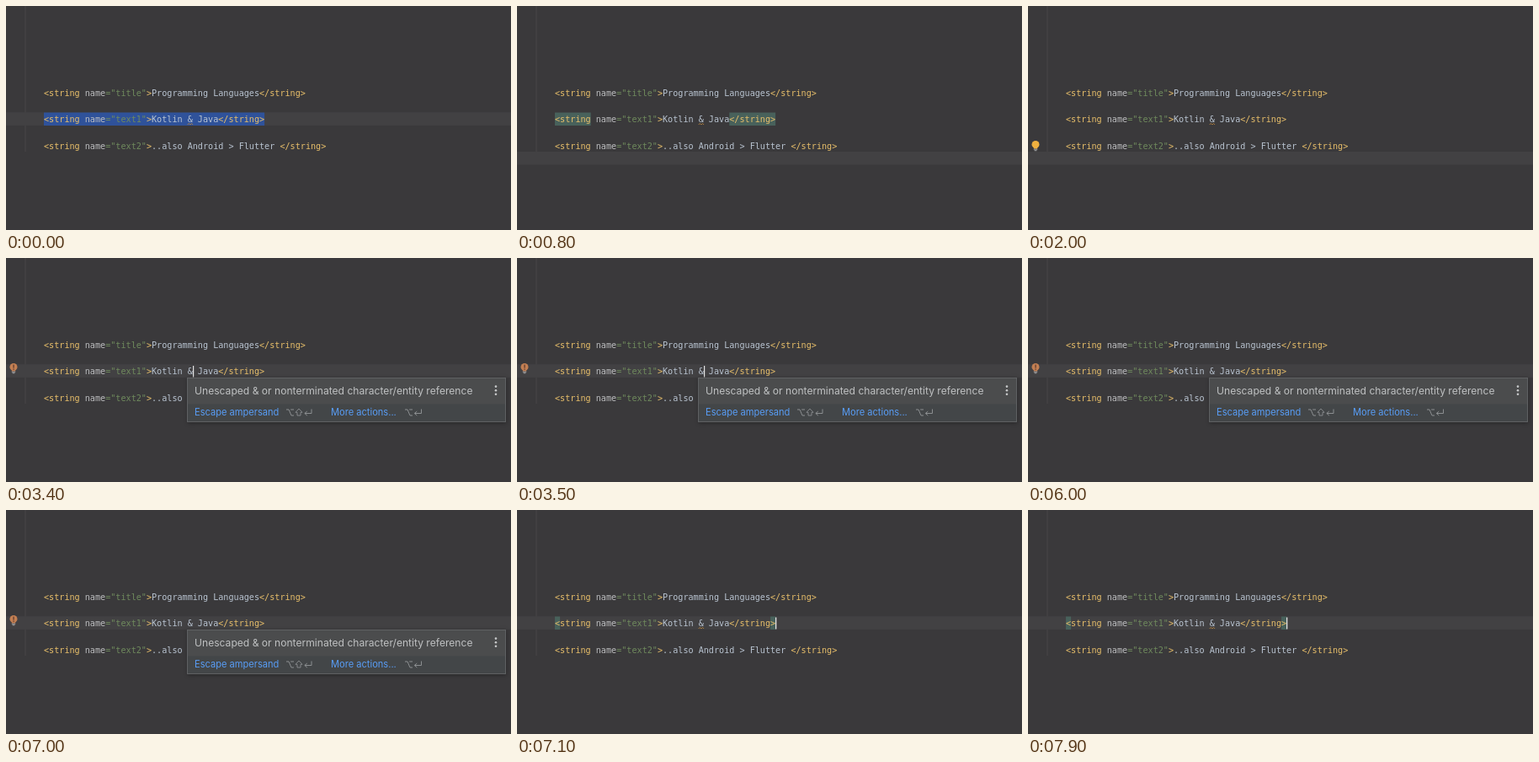
Recreate the animation shown at these times as an HTML page with a canvas. Size 600 px wide and 266 px high, loop 8 s.

```html
<!DOCTYPE html>
<html lang="en">
<head>
<meta charset="utf-8">
<title>Editor hint</title>
<style>
html, body { margin: 0; width: 100%; height: 100%; overflow: hidden; background: #3a393b; }
canvas { display: block; width: 600px; height: 266px; }
</style>
</head>
<body>
<canvas id="stage"></canvas>
<script>
const W = 600, H = 266, LOOP = 8000;
const MONO = '10.13px "DejaVu Sans Mono", monospace';
const SANS = 'Inter, Roboto, sans-serif';
const LEFT = 45;
const C = {
  bg: '#3a393b', row: '#424143', guide: '#484749',
  tag: '#e8bf6a', attr: '#bdbec0', value: '#6f8a5d', text: '#b9c4d1',
  select: '#2f529a', match: '#48615b', caret: '#e4e4e4', error: '#b9853f',
  tip: '#4b4c4d', tipFoot: '#434648', tipEdge: '#5f6163',
  tipText: '#bfc1c2', link: '#589df6', keys: '#8b8e90'
};
const LINES = [
  { y: 107, name: 'title', text: 'Programming Languages' },
  { y: 138.2, name: 'text1', text: 'Kotlin & Java' },
  { y: 169.5, name: 'text2', text: '..also Android > Flutter ' }
];

const canvas = document.getElementById('stage');
const ctx = canvas.getContext('2d');
const dpr = window.devicePixelRatio || 1;
canvas.width = W * dpr;
canvas.height = H * dpr;
ctx.scale(dpr, dpr);
ctx.font = MONO;
const charW = ctx.measureText('0').width;
const col = n => LEFT + n * charW;

function rect(x, y, w, h, color) {
  ctx.fillStyle = color;
  ctx.fillRect(x, y, w, h);
}

function dot(x, y, r, color) {
  ctx.fillStyle = color;
  ctx.beginPath();
  ctx.arc(x, y, r, 0, Math.PI * 2);
  ctx.fill();
}

function label(str, x, y, font, color) {
  ctx.font = font;
  ctx.fillStyle = color;
  ctx.fillText(str, x, y);
}

function stroke(points, color, width = 1) {
  ctx.strokeStyle = color;
  ctx.lineWidth = width;
  ctx.beginPath();
  points.forEach(([x, y], i) => i ? ctx.lineTo(x, y) : ctx.moveTo(x, y));
  ctx.stroke();
}

function codeLine({ y, name, text }) {
  let n = 0;
  const parts = [
    ['<string', C.tag], [' name', C.attr], [`="${name}"`, C.value],
    ['>', C.tag], [text, C.text], ['</string>', C.tag]
  ];
  for (const [str, color] of parts) {
    label(str, col(n), y, MONO, color);
    n += str.length;
  }
}

// Highlights a run of characters on the middle line.
function mark(from, count, color) {
  rect(col(from), 126.5, count * charW, 15.5, color);
}

function squiggle() {
  const x = col(28), pts = [];
  for (let i = 0; i <= 4; i++) pts.push([x + i * 1.6, i % 2 ? 139.4 : 141]);
  stroke(pts, C.error, 0.9);
}

function bulb(y, glass, alert) {
  dot(9, y - 1.6, 4.5, glass);
  rect(6.8, y + 1.5, 4.4, 2, glass);
  rect(6.8, y + 3.7, 4.4, 1, '#a5a6a7');
  rect(7.6, y + 5.2, 2.8, 1, '#a5a6a7');
  if (alert) {
    rect(8.4, y - 4.4, 1.3, 4, '#5f3c30');
    rect(8.4, y + 0.5, 1.3, 1.3, '#5f3c30');
  }
}

function optionKey(x) {
  stroke([[x, 180], [x + 3, 180], [x + 6, 187], [x + 9, 187]], C.keys);
  stroke([[x + 5.2, 180], [x + 9, 180]], C.keys);
}

function shiftKey(x) {
  stroke([[x + 4.5, 179], [x + 8.5, 183.3], [x + 6.5, 183.3], [x + 6.5, 187],
    [x + 2.5, 187], [x + 2.5, 183.3], [x + 0.5, 183.3], [x + 4.5, 179]], C.keys, 0.9);
}

function returnKey(x) {
  stroke([[x + 9, 179.5], [x + 9, 184.5], [x + 1, 184.5]], C.keys);
  stroke([[x + 3.8, 182], [x + 0.8, 184.5], [x + 3.8, 187]], C.keys);
}

function tooltip() {
  ctx.save();
  ctx.shadowColor = 'rgba(0,0,0,0.35)';
  ctx.shadowBlur = 5 * dpr;
  ctx.shadowOffsetY = dpr;
  rect(216, 142, 378, 52.5, C.tip);
  ctx.restore();
  rect(216, 173.5, 378, 21, C.tipFoot);
  ctx.strokeStyle = C.tipEdge;
  ctx.lineWidth = 1;
  ctx.strokeRect(215.5, 142.5, 378, 52);

  label('Unescaped & or nonterminated character/entity reference',
    224, 162, '12.1px ' + SANS, C.tipText);
  for (const y of [152.6, 157.2, 161.8]) dot(582, y, 1.3, '#c8cacb');

  const small = '11.1px ' + SANS;
  label('Escape ampersand', 224, 187, small, C.link);
  optionKey(333);
  shiftKey(343.5);
  returnKey(354);
  label('More actions...', 386, 187, small, C.link);
  optionKey(474);
  returnKey(484.5);
}

function draw(t) {
  const within = (a, b) => t >= a && t < b;
  const tip = within(3400, 7100);
  const below = within(100, 2300);
  const atEnd = t >= 7100;

  rect(0, 0, W, H, C.bg);
  rect(22.5, 0, 1, 173, C.guide);
  rect(0, below ? 173 : 126.3, W, 15.6, C.row);

  if (t < 100) mark(0, 43, C.select);
  if (within(100, 1000)) {
    mark(0, 7, C.match);
    mark(34, 9, C.match);
  }
  if (atEnd) {
    mark(0, 1, C.match);
    mark(42, 1, C.match);
  }

  LINES.forEach(codeLine);
  if (!tip) squiggle();

  if (within(1000, 2300)) bulb(166, '#efb03f', false);
  if (tip) bulb(131, '#c27f52', true);
  if (within(2300, 4300)) rect(222, 128, 1.2, 13.5, C.caret);
  if (atEnd) rect(307, 127.5, 1.3, 14, C.caret);
  if (tip) tooltip();
}

function tick(now) {
  draw(now % LOOP);
  requestAnimationFrame(tick);
}
draw(0);
requestAnimationFrame(tick);
</script>
</body>
</html>
```
